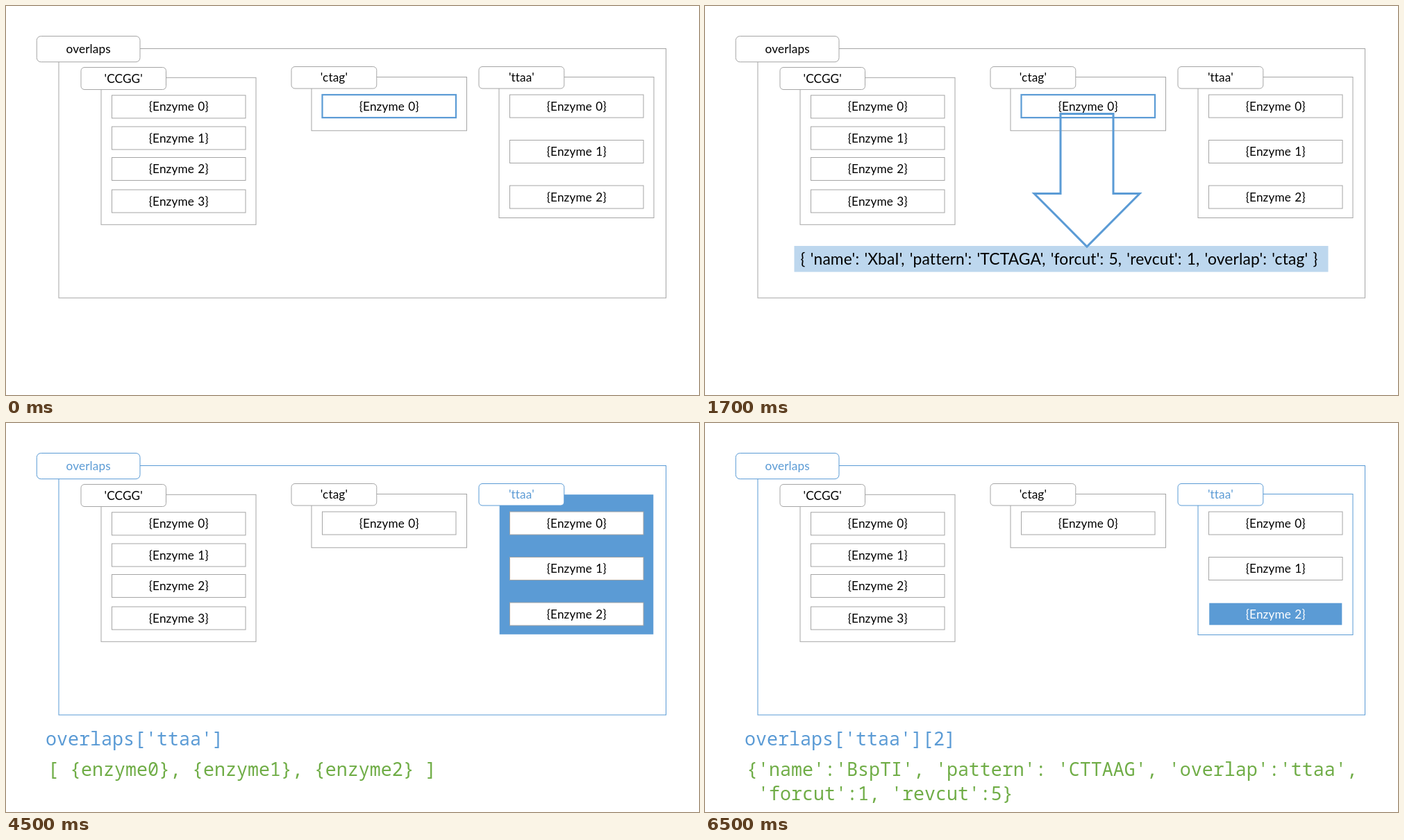
Animation of 998 by 561 pixels, one loop 8 s. Source, as an HTML page:

```html
<!DOCTYPE html>
<html lang="en">
<head>
<meta charset="utf-8">
<title>Nested dictionary lookup</title>
<style>
  html, body { margin: 0; width: 100%; height: 100%; overflow: hidden; background: #fff; }
  svg { display: block; width: 100%; height: 100%; }
  text { white-space: pre; }
  .ui { font-family: Lato, sans-serif; font-size: 17.2px; letter-spacing: .007em; word-spacing: .05em; text-anchor: middle; }
  .big { font-size: 22.8px; }
  .code { font-family: "Noto Sans Mono", monospace; font-size: 26.67px; }
</style>
</head>
<body>
<svg id="stage" viewBox="0 0 998 561"></svg>
<script>
const BLUE = '#5b9bd5', GREEN = '#70ad47', GREY = '#a5a5a5';
const LOOP = 8000;
const stage = document.getElementById('stage');

// Box styles: [fill, stroke, text colour, stroke width]
const plain = ['#fff', GREY, '#000', 1];
const thick = ['#fff', BLUE, '#000', 2.2];
const path = ['#fff', BLUE, BLUE, 1];
const picked = [BLUE, '#fff', '#fff', 1.4];

const groups = [
  { key: 'CCGG', box: [137, 103.3, 360, 315.3], tab: [108, 88.5, 230.5, 120.5], rows: [128.8, 174, 218.5, 265] },
  { key: 'ctag', box: [440, 102.5, 663.5, 179.8], tab: [411, 87.5, 533.8, 119], rows: [128] },
  { key: 'ttaa', box: [710, 102.5, 933, 305.5], tab: [681, 87.5, 803.8, 119], rows: [128, 193.5, 259] }
];

const scenes = [
  { at: 0, item: { ctag0: thick } },
  { at: 500, item: { ctag0: thick }, record: true },
  { at: 2500, root: picked, code: ['overlaps', 'Dictionary where each value is a list of enzymes'] },
  { at: 4500, root: path, tab: { ttaa: path }, group: { ttaa: picked },
    code: ["overlaps['ttaa']", '[ {enzyme0}, {enzyme1}, {enzyme2} ]'] },
  { at: 6500, root: path, tab: { ttaa: path }, group: { ttaa: path }, item: { ttaa2: picked },
    code: ["overlaps['ttaa'][2]", "{'name':'BspTI', 'pattern': 'CTTAAG', 'overlap':'ttaa',", " 'forcut':1, 'revcut':5}"] }
];

function rect([x1, y1, x2, y2], [fill, stroke, , width], r = 0) {
  return `<rect x="${x1}" y="${y1}" width="${x2 - x1}" height="${y2 - y1}" rx="${r}"
    fill="${fill}" stroke="${stroke}" stroke-width="${width}"/>`;
}

function label(x, y, text, color, cls) {
  return `<text x="${x}" y="${y}" fill="${color}" class="${cls}">${text}</text>`;
}

function labelled(box, style, text, r) {
  const [x1, y1, x2, y2] = box;
  return rect(box, style, r) + label((x1 + x2) / 2, (y1 + y2) / 2 + 6, text, style[2], 'ui');
}

function drawGroup({ key, box, tab, rows }, scene) {
  const left = box[0] + 15.5;
  const items = rows.map((y, i) =>
    labelled([left, y, left + 192.5, y + 33], scene.item?.[key + i] || plain, `{Enzyme ${i}}`));
  return rect(box, scene.group?.[key] || plain)
    + labelled(tab, scene.tab?.[key] || plain, `'${key}'`, 5) + items.join('');
}

function drawRecord() {
  const text = "{ 'name': 'XbaI', 'pattern': 'TCTAGA', 'forcut': 5, 'revcut': 1, 'overlap': 'ctag' }";
  return '<rect x="128.5" y="346" width="769" height="37.5" fill="#bdd7ee"/>'
    + label(510, 373, text, '#000', 'ui big')
    + `<path d="M512 155.5H588V270.5H626L550 347L474 270.5H512Z" fill="none" stroke="${BLUE}" stroke-width="3"/>`;
}

function drawScene(scene) {
  const root = scene.root || plain;
  const [query, ...answer] = scene.code || [''];
  return rect([76, 61.5, 950.5, 421], root)
    + labelled([44.3, 43.5, 193, 80.7], root, 'overlaps', 6)
    + groups.map(g => drawGroup(g, scene)).join('')
    + (scene.record ? drawRecord() : '')
    + label(57, 465, query, BLUE, 'code')
    + answer.map((line, i) => label(60, 509 + 35 * i, line, GREEN, 'code')).join('');
}

let shown;
function tick(now) {
  const t = now % LOOP;
  const scene = scenes.findLast(s => s.at <= t) || scenes[0];
  if (scene !== shown) {
    shown = scene;
    stage.innerHTML = drawScene(scene);
  }
  requestAnimationFrame(tick);
}
tick(0);
</script>
</body>
</html>
```
